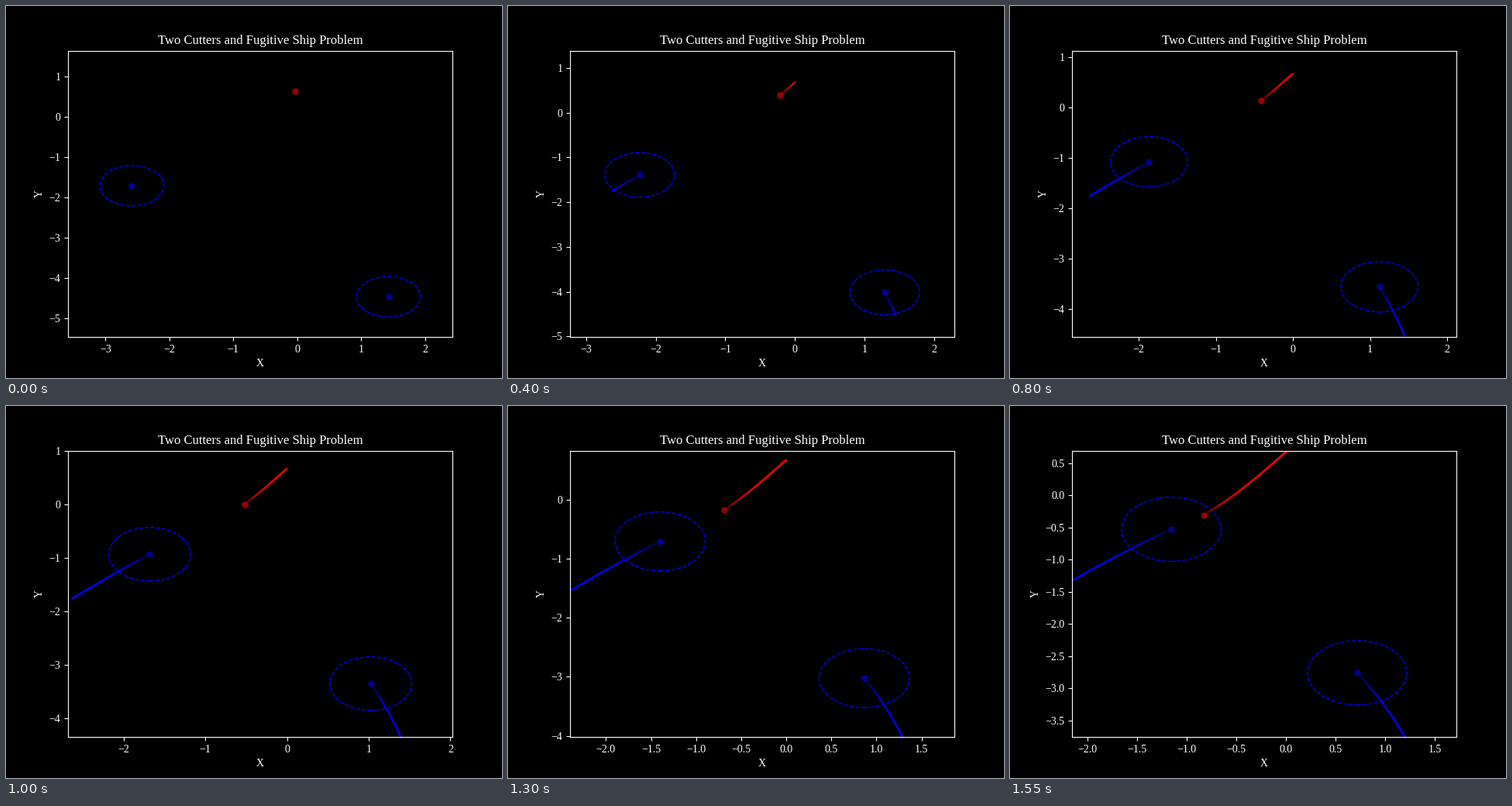
A matplotlib script for the animation above (10 s loop, 640 px wide and 480 px high).

```python
import numpy as np
import matplotlib.pyplot as plt
from matplotlib.animation import FuncAnimation
from matplotlib.collections import LineCollection
from matplotlib.patches import Circle

plt.style.use("dark_background")
plt.rcParams["font.family"] = "Liberation Serif"

INTERVAL = 50
FRAMES = 200
STEPS = 32
CUTTER_STEP = 0.06
FUGITIVE_STEP = 0.04
CAPTURE_RADIUS = 0.5
COLORS = ("blue", "blue", "red")


def chase(position, target):
    """Move one step straight toward the target."""
    sight = target - position
    return position + CUTTER_STEP * sight / np.hypot(*sight)


def simulate():
    west, east, fugitive = np.array([(-2.63, -1.755), (1.445, -4.53), (-0.005, 0.672)])
    history = [(west, east, fugitive)]
    for n in range(STEPS):
        west, east = chase(west, fugitive), chase(east, fugitive)
        heading = np.radians(53.7 - 0.0115 * (n + 0.5) ** 2)
        fugitive = fugitive - FUGITIVE_STEP * np.array([np.cos(heading), np.sin(heading)])
        history.append((west, east, fugitive))
    return np.array(history)


paths = simulate()

fig, ax = plt.subplots(figsize=(6.4, 4.8), dpi=100)
ax.set_title("Two Cutters and Fugitive Ship Problem")
ax.set_xlabel("X")
ax.set_ylabel("Y")

trails, dots = [], []
for color in COLORS:
    trail = LineCollection([], colors=color, alpha=0.2, linewidths=1.5,
                           capstyle="projecting", joinstyle="round", zorder=2)
    trails.append(ax.add_collection(trail, autolim=False))
    dots += ax.plot([], [], "o", color=color, markersize=5, alpha=0.5, zorder=3)

rings = [ax.add_patch(Circle((0, 0), CAPTURE_RADIUS, fill=False, color="blue", linestyle="--"))
         for _ in range(2)]


def update(frame):
    step = min(frame + 1, STEPS)
    ships = paths[step]
    for i, (trail, dot) in enumerate(zip(trails, dots)):
        # Every step lays the whole wake down again, so older water glows brighter.
        trail.set_segments([paths[:n + 1, i] for n in range(1, step + 1)])
        dot.set_data(ships[i, :1], ships[i, 1:])
    for ring, ship in zip(rings, ships):
        ring.center = ship
    low, high = ships.min(axis=0) - 1, ships.max(axis=0) + 1
    ax.set_xlim(low[0], high[0])
    ax.set_ylim(low[1], high[1])
    return [*trails, *dots, *rings]


anim = FuncAnimation(fig, update, frames=FRAMES, interval=INTERVAL, repeat=True, repeat_delay=0)
plt.show()
```
